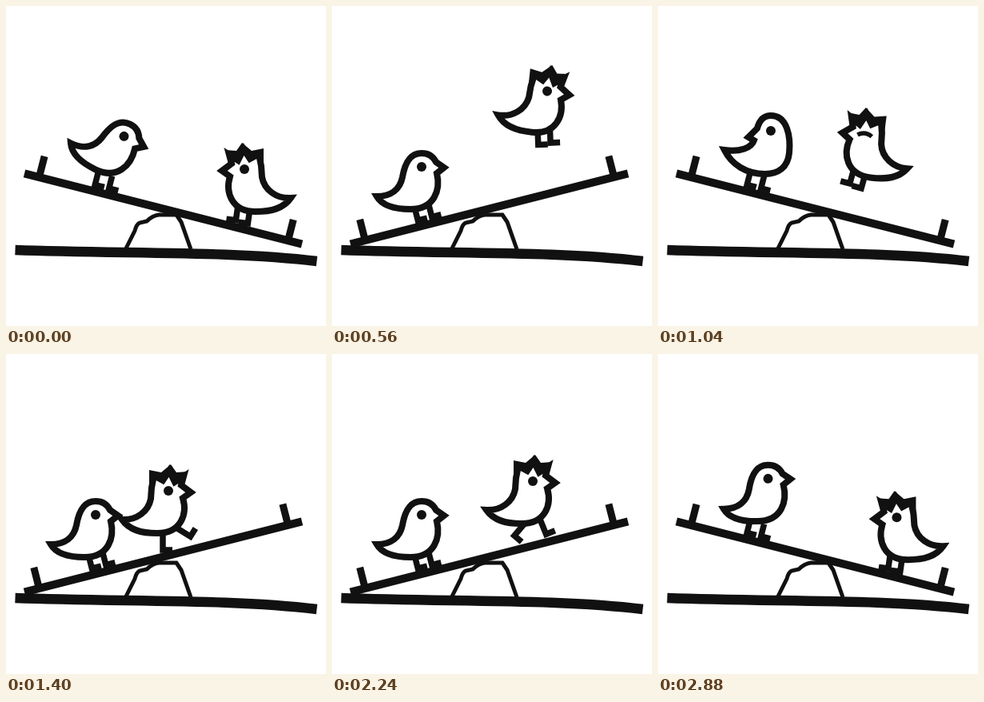
These frames come from a looping animation (400 by 400 pixels, 2920 ms). An HTML page with a canvas:

```html
<!DOCTYPE html>
<html lang="en">
<head>
<meta charset="utf-8">
<title>Seesaw birds</title>
<style>
html, body { margin: 0; height: 100%; overflow: hidden; background: #fff; }
canvas { display: block; }
</style>
</head>
<body>
<canvas id="stage" width="400" height="400"></canvas>
<script>
const ctx = document.getElementById('stage').getContext('2d');
const LOOP = 2920, STEP = 40, TILT = 14.3, INK = '#111';

// Birds are drawn around the middle of the body, facing right.
const ground = new Path2D('M11.500 305C150 310 280 306 388.500 319');
const rock = new Path2D('M150 303L161 281Q163 273 167 271L176 269Q183 262 191 261L213 261L219 270L231 304');
const plank = new Path2D('M-179 0H179');
const pegs = new Path2D('M-160 0V-27M161 0V-27');
const plainLegs = new Path2D('M-90 -24V-8H-78M-72 -24V-8H-60');
const plainBody = new Path2D('M-46 13C-28 13 -17 4 -14 -11C-11 -28 -5 -41 10 -41C19 -41 25 -36 28 -30L38 -23L29 -16C34 5 26 29 -4 29C-24 29 -39 25 -46 13Z');
const lookBack = new Path2D('M-45 0C-25 3 -11 -3 -8 -12L-15 -16L-4 -27C-1 -38 5 -43 13 -43C34 -43 38 -16 36 4C34 22 22 30 6 30C-18 30 -36 18 -45 0Z');
const crestBody = new Path2D('M-48 12C-30 13 -15 2 -12 -14L-11 -28L-8 -43L3 -37L11 -49L18 -35L29 -42L26 -31L38 -22L28 -15C34 5 26 29 -4 29C-24 29 -39 25 -48 12Z');
const crown = new Path2D('M-14 -26L-14 -50L1 -47L13 -57L20 -47L34 -48L30 -32Z');
const shutEye = new Path2D('M-9 2Q0 -4 9 2');

// When the plank starts to swing over; it begins with the right end down.
const swings = [80, 644, 1080, 2660];

// Where the crested bird is: [time, x, y, height of the arc that leads there].
const stops = [[0, 308, 228, 0], [40, 310, 228, 0], [644, 248, 184, 127], [740, 260, 222, 0],
  [965, 288, 224, 0], [1280, 193, 195, 44], [1400, 193, 195, 0], [1760, 244, 184, 0],
  [2240, 241, 183, 2], [2740, 310, 229, 113], [LOOP, 308, 228, 0]];

const clamp = u => Math.max(0, Math.min(1, u));
const smooth = u => u * u * (3 - 2 * u);
const mix = (a, b, u) => a + (b - a) * u;

// 1 with the right end down, 0 with the left end down
function rightDown(t) {
  return swings.reduce((s, at, i) => s + (i % 2 ? 1 : -1) * smooth(clamp((t - at) / 120)), 1);
}

function flight(t) {
  const i = stops.findIndex(s => s[0] > t);
  const [t0, x0, y0] = stops[i - 1], [t1, x1, y1, h] = stops[i];
  const u = (t - t0) / (t1 - t0);
  return { x: mix(x0, x1, u), y: mix(y0, y1, u) - 4 * h * u * (1 - u), u, air: h > 10 };
}

function line(path, width) {
  ctx.lineWidth = width;
  ctx.stroke(path);
}

function fill(path, colour) {
  ctx.fillStyle = colour;
  ctx.fill(path);
}

function body(path) {
  fill(path, '#fff');
  line(path, 8);
}

function place(x, y, deg, flip, draw) {
  ctx.save();
  ctx.translate(x, y);
  ctx.rotate(deg * Math.PI / 180);
  ctx.scale(flip, 1);
  draw();
  ctx.restore();
}

function eye(x, y) {
  const dot = new Path2D();
  dot.arc(x, y, 6, 0, 7);
  fill(dot, INK);
}

function leg(x, y, length, deg) {
  place(x, y, deg, 1, () => line(new Path2D(`M0 0V${length}H12`), 7.5));
}

function drawPlain(t, up) {
  const back = t >= 880 && t < 1120;
  const lean = back ? 0 : t > 2600 ? -1 : 26;
  place(mix(102, 128, up), mix(225, 180, up), up * lean, 1, () => {
    body(back ? lookBack : plainBody);
    eye(back ? 13 : 10, -24);
  });
}

function drawCrested(t, tilt) {
  const { x, y, u, air } = flight(t);
  const face = (t >= 320 && t < 860) || (t >= 1280 && t < 2440) ? 1 : -1;
  const turn = air ? 9 * Math.sqrt(Math.sin(Math.PI * u)) : tilt + TILT * face;
  const walking = t >= 1280 && t <= 2240;
  const swing = Math.cos((Math.min(t, 1760) - 1400) / 240 * 2 * Math.PI);
  place(x, y, turn, face, () => {
    leg(3, 25, walking ? 25 : 19, walking ? 20 - 20 * swing : -8);
    leg(18, 21, walking ? 23 : 19, walking ? -40 - 18 * swing : -8);
    fill(crown, INK);
    body(crestBody);
    if (t >= 1000 && t < 1120) place(10, -24, 0, 1, () => line(shutEye, 5.5));
    else eye(10, -24);
  });
}

function draw(t) {
  const up = rightDown(t), tilt = mix(-TILT, TILT, up);
  ctx.fillStyle = '#fff';
  ctx.fillRect(0, 0, 400, 400);
  ctx.strokeStyle = INK;
  ctx.miterLimit = 4;

  line(ground, 12.5);
  line(rock, 5);
  place(196.5, 253.5, tilt, 1, () => {
    line(plank, 10);
    line(pegs, 9);
    line(plainLegs, 7.5);
  });
  drawPlain(t, up);
  drawCrested(t, tilt);
}

const start = performance.now();
function tick() {
  const t = Math.max(0, performance.now() - start) % LOOP;
  draw(Math.floor(t / STEP) * STEP);
  requestAnimationFrame(tick);
}
tick();
</script>
</body>
</html>
```
